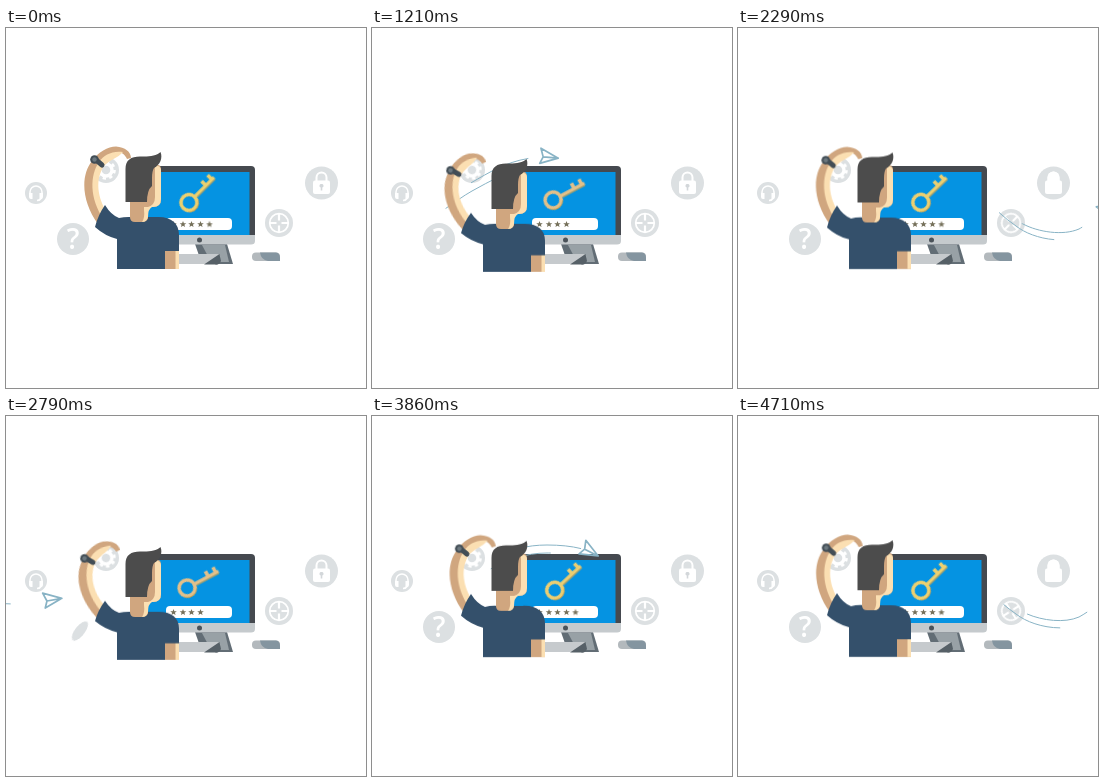
Recreate the animation shown at these times as an HTML page. Size 360 by 360 pixels, loop 4780 ms.

```html
<!DOCTYPE html>
<html lang="en">
<head>
<meta charset="utf-8">
<title>Forgotten password</title>
<style>
@property --s { syntax: "<number>"; inherits: true; initial-value: 0; }
@property --lag { syntax: "<number>"; inherits: true; initial-value: 40; }

html, body { margin: 0; width: 100%; height: 100%; overflow: hidden; background: #fff; }
svg { display: block; width: 100vw; height: 100vh; }

/* man, key and gear swing together, six times per loop */
.bob { animation: 398.333ms cubic-bezier(.65, 0, .35, 1) infinite alternate; }
.body { animation-name: body; transform-origin: 0 241px; }
.head { animation-name: head; }
.arm { animation-name: arm; transform-origin: 98px 190px; }
.key { animation-name: key; transform-origin: 190.5px 167px; }
.gold { animation-name: gold; stroke: #ecd06f; fill: none; }
.gear { animation-name: gear; transform-origin: 100px 142px; }
@keyframes body { to { transform: translateY(3px) scaleY(.925); } }
@keyframes head { to { transform: translateY(7px); } }
@keyframes arm { to { transform: translate(1px, 8px) rotate(-11deg); } }
@keyframes key { to { transform: rotate(17deg); } }
@keyframes gold { to { stroke: #e2c08a; } }
@keyframes gear { to { transform: rotate(22deg); } }

.last { animation: type 796.667ms step-end infinite; }
@keyframes type { 38% { opacity: 0; } 64% { opacity: 1; } }

/* icon reactions, once per flight */
.pass { animation: 2390ms linear infinite; }
.ask { animation-name: ask; transform-origin: 67px 211px; }
.ask-mark { animation-name: fade-ask; }
.wipe { animation-name: wipe; }
.open { animation-name: open; }
.shut { animation-name: shut; }
.aim { animation-name: aim; transform-origin: 273px 195px; }
@keyframes ask {
  0%, 10%, 24%, 100% { transform: translate(0, 0) rotate(38deg) scale(1, 1) rotate(-38deg); }
  16.7% { transform: translate(7px, 4px) rotate(38deg) scale(.3, .72) rotate(-38deg); }
}
@keyframes fade-ask { 0%, 10%, 24%, 100% { opacity: 1; } 14%, 19% { opacity: 0; } }
@keyframes wipe { 0%, 23%, 36%, 100% { r: 0; } 29%, 30.5% { r: 16px; } }
@keyframes open { 0%, 91% { opacity: 0; } 95%, 100% { opacity: 1; } }
@keyframes shut { 0%, 91% { opacity: 1; } 95%, 100% { opacity: 0; } }
@keyframes aim { 0%, 86% { transform: rotate(0); } 96% { transform: rotate(45deg); } 100% { transform: rotate(90deg); } }

/* two flights per loop; the second is cut off by the restart */
.fly { animation: fly1 4780ms linear infinite; fill: none; stroke: #88b3c5; stroke-linecap: round; }
.second { animation-name: fly2; }
.fly path { stroke-width: 1.7; }
.trail { stroke-dasharray: 62px 1000px; stroke-dashoffset: calc((var(--lag) + 62 - var(--s)) * 1px); }
.low { stroke-dashoffset: calc((var(--lag) + 92 - var(--s)) * 1px); }
.plane {
  offset-path: path("M-70 177C-30 187 15 192 45 184C62 180 78 166 97 156C120 143 140 129 175 129C192 129 206 131 217 135C227 139 235 145 242 153C258 171 270 190 285 196C300 204 325 208 341 201C352 195 360 188 368 182L500 70");
  offset-distance: calc(var(--s) * 1px);
  offset-rotate: auto 12deg;
  stroke-linejoin: round;
}
@keyframes fly1 {
  0% { --s: 40; --lag: 42; }
  8.37% { --s: 117; --lag: 42; }
  14.85% { --s: 180; --lag: 42; }
  30.75% { --s: 302; --lag: 9; }
  34.31% { --s: 335; --lag: 16; }
  47.91% { --s: 487; --lag: 32; }
  50% { --s: 498; --lag: 23; }
  58.37% { --s: 590; --lag: 20; }
  60.67%, 100% { --s: 620; --lag: 20; }
}
@keyframes fly2 {
  0%, 50% { --s: 40; --lag: 42; }
  58.37% { --s: 117; --lag: 42; }
  64.85% { --s: 180; --lag: 42; }
  80.75% { --s: 302; --lag: 9; }
  84.31% { --s: 335; --lag: 16; }
  97.91% { --s: 487; --lag: 32; }
  100% { --s: 498; --lag: 23; }
}

.disc { fill: #dce0e2; }
.line { fill: none; stroke: #fff; }
.mark { font: 600 28px "Open Sans", sans-serif; fill: #fff; text-anchor: middle; }
.skin { fill: #d0a67f; }
.light { fill: #fbdfb2; }
</style>
</head>
<body>
<svg viewBox="0 0 360 360">
  <defs>
    <path id="star" d="M0-3.4L.9-1.1L3.3-1L1.4.5L2.1 2.8L0 1.5L-2.1 2.8L-1.4.5L-3.3-1L-.9-1.1Z" fill="#75705a"/>
    <g id="flight">
      <path class="trail" d="M-70 177C-30 187 15 192 45 184C62 180 78 166 97 156C120 143 140 129 175 129C192 129 206 131 217 135C227 139 235 145 242 153C258 171 270 190 285 196C300 204 325 208 341 201C352 195 360 188 368 182L500 70"/>
      <path class="trail low" d="M-70 184C-30 194 10 199 45 194C68 188 82 173 100 163C124 150 145 137 175 137C190 137 202 138 212 142C222 147 230 152 238 161C250 174 262 187 278 198C292 209 320 217 346 208C357 203 366 195 374 188L505 78"/>
    </g>
  </defs>

  <!-- headset -->
  <circle class="disc" cx="30" cy="165" r="11"/>
  <path class="line" stroke-width="1.5" d="M24 166V164A6 6 0 0 1 36 164V166M35.500 170Q34 172.500 31 172.500"/>
  <path fill="#fff" d="M23 165h3.500v6h-1.500q-2 0-2-2zM37 165h-3.500v6h1.500q2 0 2-2z"/>
  <circle class="pass wipe" cx="29" cy="174" r="0" fill="#fff"/>

  <!-- question -->
  <g class="pass ask">
    <circle class="disc" cx="67" cy="211" r="16"/>
    <text class="pass ask-mark mark" x="67" y="221">?</text>
  </g>

  <!-- gear -->
  <circle class="disc" cx="100" cy="142" r="13"/>
  <g class="bob gear">
    <circle class="line" cx="100" cy="142" r="6" stroke-width="3.4"/>
    <circle class="line" cx="100" cy="142" r="8.500" stroke-width="2.600" pathLength="16" stroke-dasharray="1 1"/>
  </g>

  <!-- aim -->
  <circle class="disc" cx="273" cy="195" r="14"/>
  <g class="pass aim line">
    <circle cx="273" cy="195" r="9.300" stroke-width="1.700"/>
    <path stroke-width="2.200" d="M273 185v7.500M273 197.500v7.500M263 195h7.500M275.500 195h7.500"/>
  </g>

  <!-- lock -->
  <circle class="disc" cx="315.500" cy="155" r="16.500"/>
  <rect x="307" y="152.500" width="17" height="13.500" rx="2" fill="#fff"/>
  <path class="line" stroke-width="2" d="M310.500 153V149.500A5 5 0 0 1 320.500 149.500V153"/>
  <path class="pass open" fill="#fff" d="M309.500 154V149.500A6 6 0 0 1 321.500 149.500V154Z"/>
  <path class="pass shut" fill="#d3d7da" d="M315.500 156a1.800 1.800 0 0 1 .8 3.500v3h-1.600v-3a1.800 1.800 0 0 1 .8-3.500z"/>

  <!-- monitor -->
  <path fill="#626d75" d="M189 216H221L227 236H196Z"/>
  <path fill="#98a1a6" d="M196 217H219L223 234H205Z"/>
  <path fill="#c6cacd" d="M165 226H211Q215 226 214 231L212 236H165Z"/>
  <path fill="#566067" d="M213.500 226L215 233Q213 237.500 209 236.500H198Z"/>
  <path fill="#45494f" d="M140 138H245Q249 138 249 142V208H140Z"/>
  <path fill="#0593e2" d="M140 144H243.500V207H140Z"/>
  <path fill="#c5cacd" d="M140 207H249V213Q249 216.500 245 216.500H140Z"/>
  <circle cx="193.500" cy="212" r="2.500" fill="#4a5259"/>
  <rect x="246" y="224.500" width="28" height="8.500" rx="4" fill="#b3b9bd"/>
  <path fill="#8495a0" d="M254 224.500H270Q274 225 274 230V233H262Q255 232 254 224.500Z"/>

  <rect x="160" y="190" width="66" height="12" rx="4" fill="#fff"/>
  <use href="#star" x="167.500" y="196.300"/>
  <use href="#star" x="177" y="196.300"/>
  <use href="#star" x="185.500" y="196.300"/>
  <use href="#star" x="194.500" y="196.300"/>
  <use href="#star" class="last" x="203.500" y="196.300"/>

  <g class="bob key">
    <g transform="translate(183 174.500) rotate(-45)">
      <g class="bob gold" stroke-width="3.600">
        <circle r="8"/>
        <path d="M8 0H35.500M24-1V-6.200M32.500-1V-6.200"/>
      </g>
      <path fill="none" stroke="#c99f4c" stroke-width="1" d="M10 2H35M-7 6.500A9.600 9.600 0 0 0 8.500 4.500"/>
    </g>
  </g>

  <g class="fly"><use href="#flight"/><path class="plane" d="M10-1L-9-7L-5 1L-7 8ZM10-1L-5 1"/></g>
  <g class="fly second"><use href="#flight"/><path class="plane" d="M10-1L-9-7L-5 1L-7 8ZM10-1L-5 1"/></g>

  <!-- man -->
  <g class="bob arm">
    <path class="skin" d="M92 196C76 174 74 148 86 133C92 124 102 118.500 110 118.500C119 119 125 124 125 130L121 131C119 127 116 124 112 124C106 129 99 132 96 138C88 150 90 172 101 187Z"/>
    <path class="light" d="M98 192C83 170 84 147 93 134C98 127 106 122.500 117 124C112 130 103 132 98 138C89 151 91 170 102 186Z"/>
    <path fill="none" stroke="#424d55" stroke-width="5" stroke-linecap="round" d="M89 131L96 137"/>
    <circle cx="88.500" cy="131.500" r="4.300" fill="#424d55"/>
    <circle cx="88.500" cy="131.500" r="2.200" fill="#6c787f"/>
  </g>
  <g class="bob body">
    <path class="skin" d="M159 221H173V241H159Z"/>
    <path class="light" d="M169.500 221H173V241H169.500Z"/>
    <path fill="#34506b" d="M99 177Q105 187 113 190Q119 188.500 126 189H151C165 188.500 173 195 173 207V223H159V241H111V211Q99 208 89 199Q92 187 99 177Z"/>
  </g>
  <g class="bob head">
    <path class="skin" d="M124 170H142V190Q141 194 136 194H129Q124 194 124 189Z"/>
    <path class="light" d="M138 172H146V179Q142 181 142 189Q141 194 136 194Q139 190 138 182Z"/>
    <path class="skin" d="M138 137H152Q155 137 155 142V171Q155 179 147 179H138Z"/>
    <path class="light" d="M149 137Q155 138 155 142V171Q155 179 147 179H142Q149 177 149 169Z"/>
    <path fill="#4c4c4c" d="M119.500 174V141C119.500 132 125 128.500 134 128.500C143 129 150 128 154.500 124C157 130 154 137 148 140Q146 143 146 150V158Q141 162 141 174Z"/>
  </g>
</svg>
</body>
</html>
```
